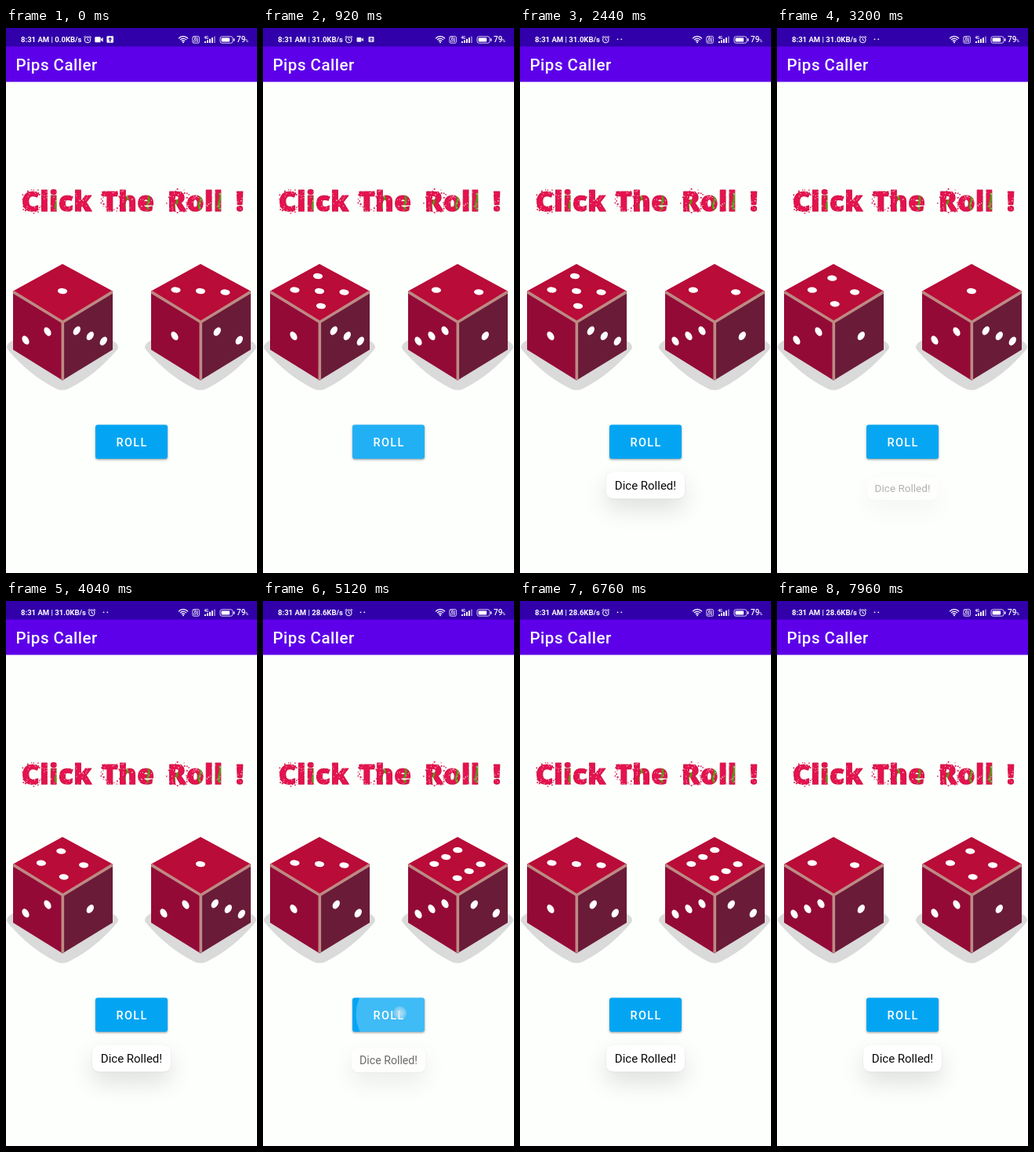
Recreate the animation shown at these times as an HTML page with a canvas. Size 320 px wide and 693 px high, loop 8 s.

```html
<!DOCTYPE html>
<html lang="en">
<head>
<meta charset="utf-8">
<title>Pips Caller</title>
<style>
  html, body { margin: 0; width: 100%; height: 100%; overflow: hidden; background: #fdfffc; }
  canvas { display: block; width: 100vw; height: 100vh; }
</style>
</head>
<body>
<canvas id="stage"></canvas>
<script>
const W = 320, H = 693, LOOP = 8000, STEP = 40, TAU = Math.PI * 2;
const canvas = document.getElementById('stage');
const ratio = Math.max(1, window.devicePixelRatio || 1);
canvas.width = W * ratio;
canvas.height = H * ratio;
const ctx = canvas.getContext('2d');

const SANS = 'Roboto, sans-serif';
const STATUS = '#3100aa';
const presses = [640, 2860, 4960, 6960];
const rolls = ['13', '52', '41', '36', '24'];

const clamp = v => Math.min(1, Math.max(0, v));
const ramp = (t, from, length) => clamp((t - from) / length);
const easeOut = v => 1 - (1 - v) ** 2;

function seeded(seed) {
  return () => (seed = (seed * 16807) % 2147483647) / 2147483647;
}

function disc(c, x, y, r) {
  c.beginPath();
  c.arc(x, y, r, 0, TAU);
  c.fill();
}

function poly(fill, ...p) {
  ctx.beginPath();
  for (let i = 0; i < p.length; i += 2) ctx.lineTo(p[i], p[i + 1]);
  ctx.fillStyle = fill;
  ctx.fill();
}

function line(...p) {
  ctx.beginPath();
  for (let i = 0; i < p.length; i += 2) ctx.lineTo(p[i], p[i + 1]);
  ctx.stroke();
}

function box(x, y, w, h, r) {
  ctx.beginPath();
  ctx.roundRect(x, y, w, h, r);
}

function label(text, x, y, font, color, spacing = 0, align = 'left') {
  ctx.font = `${font} ${SANS}`;
  ctx.fillStyle = color;
  ctx.letterSpacing = spacing + 'px';
  ctx.textAlign = align;
  ctx.fillText(text, x, y);
  ctx.letterSpacing = '0px';
}

function castShadow(color, blur, dy) {
  ctx.shadowColor = color;
  ctx.shadowBlur = blur * ratio;
  ctx.shadowOffsetY = dy * ratio;
}

function makeHeading() {
  const layer = document.createElement('canvas');
  layer.width = W * ratio;
  layer.height = 50 * ratio;
  const c = layer.getContext('2d');
  const rand = seeded(4711);
  c.scale(ratio, ratio);
  c.font = '800 35px "Open Sans", sans-serif';
  c.letterSpacing = '0.5px';
  c.lineJoin = 'round';
  c.lineWidth = 1.2;
  c.fillStyle = '#e6124f';
  c.strokeStyle = '#cf1748';
  const words = { Click: 20, The: 122, Roll: 206, '!': 293 };
  for (const [word, x] of Object.entries(words)) {
    c.fillText(word, x, 38);
    c.strokeText(word, x, 38);
  }

  // Green vines and pale speckles stay inside the letters
  c.globalCompositeOperation = 'source-atop';
  c.strokeStyle = '#4f9d10';
  c.lineWidth = 2.6;
  for (const x of [55, 64, 154, 181, 217, 247, 264, 272]) {
    const top = 14 + rand() * 7;
    c.beginPath();
    c.moveTo(x, top);
    c.bezierCurveTo(x + 5, top + 6, x - 5, 30, x + 1, 36);
    c.stroke();
  }
  c.fillStyle = 'rgba(255,235,240,.85)';
  for (let i = 0; i < 260; i++) disc(c, 20 + rand() * 284, 11 + rand() * 28, 0.6);

  // Loose dots surround the capitals
  c.globalCompositeOperation = 'destination-over';
  c.fillStyle = '#d9265c';
  for (const x of [34, 135, 220]) {
    for (let i = 0; i < 34; i++) {
      const a = i / 34 * TAU, r = 10 + rand() * 6;
      disc(c, x + Math.cos(a) * r, 25 + Math.sin(a) * r, 0.6 + rand() * 0.6);
    }
  }
  return layer;
}
const heading = makeHeading();

function pip(x, y, rx, ry, angle) {
  ctx.beginPath();
  ctx.ellipse(x, y, rx, ry, angle, 0, TAU);
  ctx.fill();
}

function topPips(n) {
  const put = (dx, dy) => pip(72 + dx, 334.5 + dy, 6.1, 3.6, 0.08);
  if (n === 6) {
    for (const row of [-1, 1])
      for (const k of [-1, 0, 1]) put(row * 14.7 + k * 15, row * 9 - k * 8.8);
    return;
  }
  if (n % 2) put(0, 0);
  const spread = n % 2 ? 1 : 0.86;
  for (const s of [-spread, spread]) {
    if (n > 1) put(s * 31.5, s * 1.5);
    if (n > 3) put(s * 2, s * 19);
  }
}

function sidePips(n, x, step, slope, angle) {
  for (let i = 0; i < n; i++) {
    const d = (i - (n - 1) / 2) * step(n);
    pip(x + d, 391.5 + d * slope, 6.1, 3.9, angle);
  }
}

// Opposite top faces mirror the order of the two side faces
function sideValues(top) {
  const low = Math.min(top, 7 - top);
  const pair = [low % 3 + 1, (low + 1) % 3 + 1];
  return top > 3 ? pair.reverse() : pair;
}

function die(x, top) {
  ctx.save();
  ctx.translate(x, 0);
  ctx.fillStyle = '#d9dad9';
  ctx.beginPath();
  ctx.moveTo(72, 397);
  for (const s of [-1, 1]) {
    const at = d => 72 + s * d;
    ctx.moveTo(72, 397);
    ctx.lineTo(at(63), 397);
    ctx.quadraticCurveTo(at(76), 404, at(68), 411);
    ctx.quadraticCurveTo(at(42), 441, at(11), 457);
    ctx.quadraticCurveTo(at(5), 460.5, 72, 460.5);
  }
  ctx.fill();

  poly('#930a37', 9, 334.5, 72, 373, 72, 448, 9, 409);
  poly('#6a1b38', 136, 334.5, 72, 373, 72, 448, 136, 409);
  poly('#b90c38', 72, 300, 136, 334.5, 72, 374, 9, 334.5);
  ctx.strokeStyle = '#bd8a84';
  ctx.lineWidth = 3.6;
  line(9.3, 335.6, 72.3, 374, 135.7, 335.6);
  line(72.3, 374, 72.3, 447.5);

  ctx.fillStyle = '#fff';
  const [left, right] = sideValues(top);
  const step = n => n === 2 ? 28 : 17;
  topPips(top);
  sidePips(left, 39, step, -0.39, 1.02);
  sidePips(right, 107.3, step, 0.39, -0.98);
  ctx.restore();
}

function alarm(x) {
  ctx.lineWidth = 1;
  ctx.beginPath();
  ctx.arc(x, 15, 3.8, 0, TAU);
  ctx.stroke();
  line(x, 12.7, x, 15.2, x + 1.7, 16.2);
  for (const s of [-1, 1]) line(x + s * 4.8, 12, x + s * 2.5, 10.2);
}

function shrunk(x, y, fold, fade, draw) {
  ctx.save();
  ctx.translate(x, y);
  ctx.scale(1 - fold * 0.4, 1 - fold * 0.4);
  ctx.globalAlpha = 1 - fold * fade;
  draw();
  ctx.restore();
}

function noticeIcons(t, shift) {
  const fold = ramp(t, 820, 220);
  if (fold === 1) {
    for (const x of [124.5, 129.3]) disc(ctx, x, 14.3, 0.9);
    return;
  }
  shrunk(118.3 + shift, 14.8, fold, 0.2, () => {
    box(-5, -3.5, 7.3, 7, 1);
    ctx.fill();
    poly('#fff', 2, 0, 5.3, -3, 5.3, 3);
  });
  shrunk(132.7 + shift, 14.5, fold, 0.4, () => {
    box(-4.3, -4.3, 8.6, 8.6, 1);
    ctx.fill();
    poly(STATUS, 0, -3, 2.7, 0, -2.7, 0);
    ctx.fillRect(-0.8, 0, 1.6, 3);
  });
}

function statusBar(t) {
  ctx.fillStyle = STATUS;
  ctx.fillRect(0, 0, W, 23.5);
  const speed = t < 800 ? '0.0' : t < 4240 ? '31.0' : '28.6';
  const shift = t < 800 ? 0 : 5.3;
  label(`8:31 AM | ${speed}KB/s`, 19, 18, 'bold 9.5px', '#fff');
  ctx.strokeStyle = ctx.fillStyle = '#fff';
  alarm(104 + shift);
  noticeIcons(t, shift);

  ctx.strokeStyle = ctx.fillStyle = '#fff';
  ctx.lineWidth = 1.2;
  for (let r = 2.8; r < 9; r += 2.6) {
    ctx.beginPath();
    ctx.arc(226, 18.7, r, -Math.PI * 0.77, -Math.PI * 0.23);
    ctx.stroke();
  }
  disc(ctx, 226, 18.3, 1);
  ctx.lineWidth = 0.8;
  box(237.8, 10.6, 8.6, 8.6, 1.5);
  ctx.stroke();
  label('Vo', 242, 14.6, 'bold 4.5px', '#fff', 0, 'center');
  label('LTE', 242, 18.4, 'bold 4px', '#fff', 0, 'center');
  label('4G', 252.5, 13.5, 'bold 4.5px', '#fff');
  for (let i = 0; i < 5; i++) {
    ctx.globalAlpha = i < 4 ? 1 : 0.45;
    ctx.fillRect(253 + i * 3, 17 - i * 1.6, 1.9, 2 + i * 1.6);
  }
  ctx.globalAlpha = 1;
  box(273, 10.8, 16, 8.4, 2.3);
  ctx.stroke();
  box(274.6, 12.4, 10.6, 5.2, 1);
  ctx.fill();
  ctx.fillRect(290, 13.3, 1.4, 3.4);
  label('79', 294, 18.3, '500 10px', '#fff');
  label('%', 305, 18.3, '500 5.5px', '#fff');
}

function buttonShape() {
  box(114, 504.6, 92, 43.2, 3);
}

function button(t) {
  ctx.save();
  castShadow('rgba(0,0,0,.38)', 3, 1.3);
  ctx.fillStyle = '#03a5f3';
  buttonShape();
  ctx.fill();
  ctx.restore();

  const ages = presses.map(down => t - down).filter(age => age >= 0 && age < 400);
  for (const age of ages) {
    const grow = ramp(age, 0, 225);
    ctx.save();
    buttonShape();
    ctx.clip();
    ctx.fillStyle = `rgba(255,255,255,${0.24 * (1 - ramp(age, 210, 140))})`;
    disc(ctx, 175 - 7 * grow, 524 + 2 * grow, 8 + 61 * grow);
    ctx.restore();
  }
  label('ROLL', 140.5, 532, '500 14.5px', '#fff', 1.35);
  ctx.fillStyle = 'rgba(210,232,243,.34)';
  for (const age of ages) {
    if (age <= 180) for (const r of [8.5, 6, 3.2]) disc(ctx, 174.5, 524, r);
  }
}

function toast(alpha, away) {
  if (alpha <= 0) return;
  const shape = () => box(-50, -16.8, 100, 33.6, 9);
  ctx.save();
  ctx.globalAlpha = alpha;
  ctx.translate(160, 581.5 + away * 5);
  ctx.scale(1 - away * 0.14, 1 - away * 0.14);
  ctx.fillStyle = '#fff';

  // Shadows fall only outside the card, so a fading card stays white
  ctx.save();
  shape();
  ctx.rect(-160, -100, 320, 200);
  ctx.clip('evenodd');
  shape();
  castShadow('rgba(0,0,0,.13)', 30, 13);
  ctx.fill();
  castShadow('rgba(0,0,0,.13)', 2, 0.4);
  ctx.fill();
  ctx.restore();

  shape();
  ctx.fill();
  label('Dice Rolled!', 0, 5.4, '15px', '#080808', 0, 'center');
  ctx.restore();
}

function toasts(t) {
  presses.forEach((down, i) => {
    const shown = easeOut(ramp(t, down + 300, 240));
    const gone = ramp(t, (presses[i + 1] ?? LOOP) + 100, 150);
    toast(shown * (1 - gone), gone || 1 - shown);
  });
}

function render(t) {
  ctx.setTransform(canvas.width / W, 0, 0, canvas.height / H, 0, 0);
  ctx.fillStyle = '#fdfffc';
  ctx.fillRect(0, 0, W, H);
  ctx.fillStyle = '#5d00e9';
  ctx.fillRect(0, 0, W, 68.5);
  statusBar(t);
  label('Pips Caller', 12.5, 54.3, '500 20.5px', '#fff', 0.5);
  ctx.drawImage(heading, 0, 195, W, 50);
  const rolled = presses.filter(down => t >= down + 110).length;
  [...rolls[rolled]].forEach((top, i) => die(i * 176, +top));
  toasts(t);
  button(t);
}

const start = performance.now();
function tick() {
  const t = (performance.now() - start) % LOOP;
  render(Math.floor(t / STEP) * STEP);
  requestAnimationFrame(tick);
}
tick();
</script>
</body>
</html>
```
